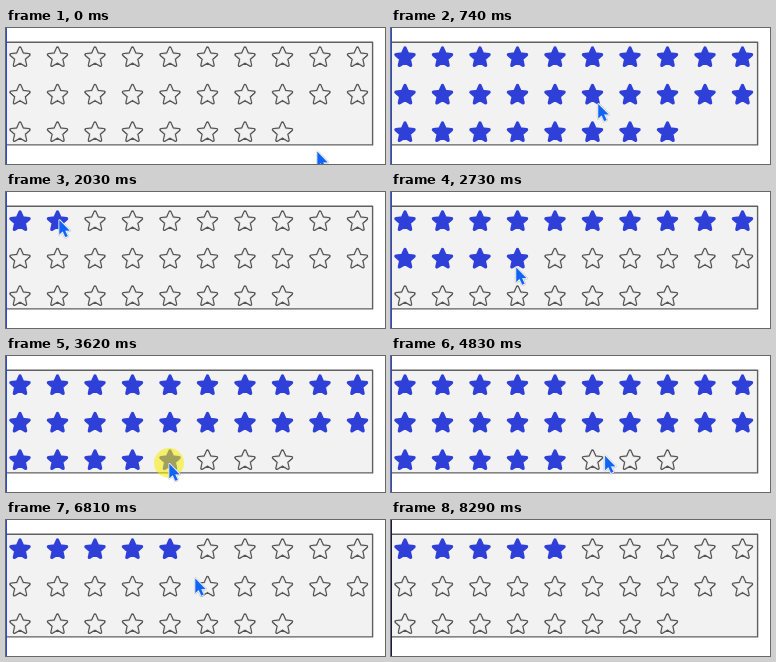
An HTML page with a canvas that plays this animation: 379 by 136 pixels, repeating every 8440 ms.

```html
<!DOCTYPE html>
<html lang="en">
<head>
<meta charset="utf-8">
<title>Star rating</title>
<style>
  html, body { margin: 0; width: 100%; height: 100%; overflow: hidden; background: #fff; }
  canvas { display: block; }
</style>
</head>
<body>
<canvas id="stage" width="379" height="136"></canvas>
<script>
const LOOP = 8440, STEP = 70, PRESS = 120;
const STARS = 28, PER_ROW = 10, PITCH = 37.5, REACH = 10.5;
const PANEL = { top: 14.3, right: 366.6, bottom: 116.9, color: '#f2f2f2' };
const BLUE = '#2f40d8';
const ctx = document.getElementById('stage').getContext('2d');

const linear = p => p;
const smooth = p => (p + (1 - Math.cos(Math.PI * p)) / 2) / 2;

// Pointer strokes along quadratic curves; press is the time of the click that follows.
const moves = [
  { start: 460, steps: 14, from: [311, 123], via: [157, 46], to: [49, 25], press: 1630 },
  { start: 2030, steps: 18, from: [49, 25], via: [112, 60], to: [163, 107], press: 3620, ease: smooth },
  { start: 3880, steps: 5, from: [163, 107], via: [187, 123], to: [211, 140] },
  { start: 4690, steps: 16, from: [226, 140], via: [192, 19], to: [169, 23], press: 6200 },
  { start: 6600, steps: 9, from: [169, 24], via: [185, 42], to: [230, 150] }
];

function pointOn({ from, via, to, steps, ease = linear }, step) {
  const p = ease(step / steps), q = 1 - p;
  return from.map((a, i) => q * q * a + 2 * p * q * via[i] + p * p * to[i]);
}

function starCenter(index) {
  return [14 + PITCH * (index % PER_ROW), 29.6 + PITCH * Math.floor(index / PER_ROW)];
}

function starUnder([x, y]) {
  for (let i = 0; i < STARS; i++) {
    const [cx, cy] = starCenter(i);
    if (Math.hypot(x - cx, y - cy) < REACH) return i + 1;
  }
  return 0;
}

// Replays the pointer: hovering previews a rating, leaving the panel restores the chosen one.
function buildTimeline() {
  const timeline = [{ time: 0, point: moves[0].from, rating: 0 }];
  let rating = 0, chosen = 0;
  const hover = point => {
    rating = point[1] > PANEL.bottom ? chosen : starUnder(point) || rating;
  };
  for (const move of moves) {
    for (let step = 1; step <= move.steps; step++) {
      hover(pointOn(move, step - 1)); // the preview trails the pointer by one step
      if (step === move.steps) hover(move.to);
      timeline.push({ time: move.start + (step - 1) * STEP, point: pointOn(move, step), rating });
    }
    if (move.press) chosen = rating;
  }
  return timeline;
}

function starPath(outer, inner) {
  const path = new Path2D();
  for (let i = 0; i < 10; i++) {
    const r = i % 2 ? inner : outer;
    const a = i * Math.PI / 5 - Math.PI / 2;
    path.lineTo(r * Math.cos(a), r * Math.sin(a));
  }
  path.closePath();
  return path;
}

const timeline = buildTimeline();
const star = starPath(9.5, 4.4);
const arrow = new Path2D('M0.5 1V15L3.8 12L6.4 17.8L8.6 16.8L6 11.2H10.4Z');

function drawAt([x, y], draw) {
  ctx.save();
  ctx.translate(x, y);
  draw();
  ctx.restore();
}

function paint(path, color, width) {
  ctx.fillStyle = ctx.strokeStyle = color;
  ctx.lineWidth = width;
  ctx.fill(path);
  ctx.stroke(path);
}

function drawStar(filled) {
  paint(star, filled ? BLUE : '#555', 3.4);
  if (!filled) paint(star, PANEL.color, 0.9);
}

function drawArrow() {
  paint(arrow, 'rgba(90, 90, 110, 0.3)', 3);
  paint(arrow, '#fff', 2);
  paint(arrow, '#1064f5', 0.4);
}

function drawPanel(t) {
  const { top, right, bottom, color } = PANEL;
  ctx.fillStyle = '#fff';
  ctx.fillRect(0, 0, 379, 136);
  ctx.fillStyle = color;
  ctx.fillRect(0, top, right, bottom - top);
  ctx.strokeStyle = '#606060';
  ctx.lineWidth = 1.4;
  ctx.strokeRect(-2, top, right + 2, bottom - top);
  ctx.fillStyle = t < 8290 ? '#2c48e0' : '#181840';
  ctx.fillRect(0, 0, 1, 136);
}

function render(t) {
  const { point, rating } = timeline.findLast(entry => entry.time <= t);
  drawPanel(t);
  for (let i = 0; i < STARS; i++) drawAt(starCenter(i), () => drawStar(i < rating));

  const pressed = moves.find(({ press }) => t >= press && t < press + PRESS);
  if (pressed) {
    ctx.fillStyle = 'rgba(250, 238, 0, 0.56)';
    ctx.beginPath();
    ctx.arc(...pressed.to, 15, 0, 2 * Math.PI);
    ctx.fill();
  }
  drawAt(point, drawArrow);
}

ctx.lineJoin = 'round';
const begin = performance.now();
function tick() {
  render((performance.now() - begin) % LOOP);
  requestAnimationFrame(tick);
}
tick();
</script>
</body>
</html>
```
